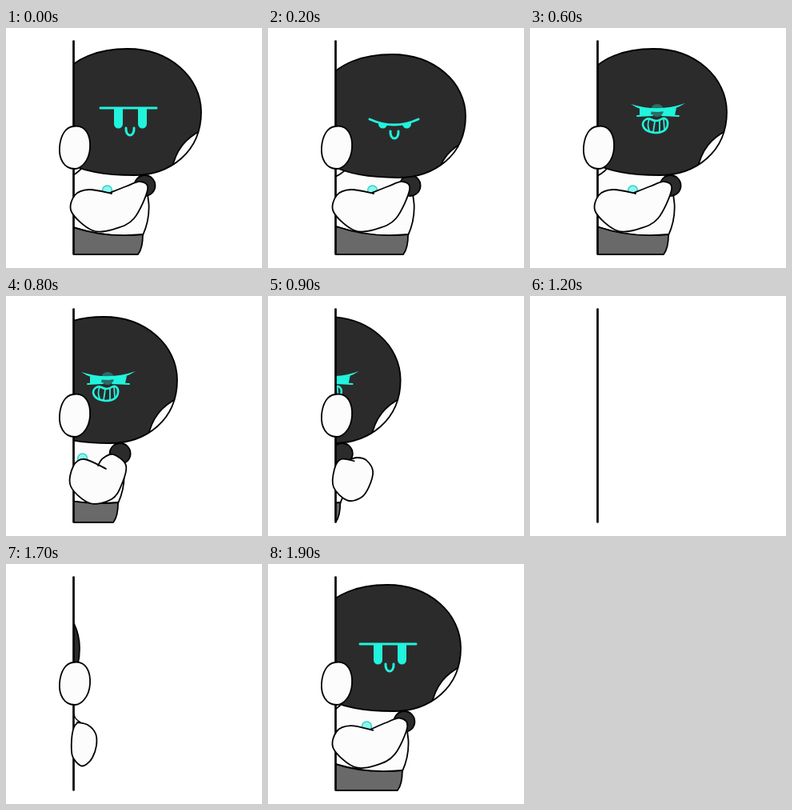
These frames come from a looping animation (320 by 300 pixels, 2 s). An HTML page with a canvas:

```html
<!DOCTYPE html>
<html lang="en">
<head>
<meta charset="utf-8">
<title>Peeking robot</title>
<style>
html, body { margin: 0; width: 100%; height: 100%; overflow: hidden; background: #fff; }
canvas { display: block; }
</style>
</head>
<body>
<canvas id="stage" width="320" height="300"></canvas>
<script>
const ctx = document.getElementById('stage').getContext('2d');
const WALL = 84.5, INK = '#000', DARK = '#2b2b2b', WHITE = '#fcfcfc', CYAN = '#22f3dc', GREY = '#696969';
const STEP = 100, LOOP = 2000;

const shape = d => new Path2D(d);
const HEAD = shape('M70 60C85 38 115 26 152 26C205 26 244 62 244 105C244 155 205 184 160 184C125 184 95 180 70 165Z');
const EAR = shape('M246 127C225 137 212 152 207 178L250 195L255 127Z');
const TORSO = shape('M70 165L165 180C182 205 182 235 171 259C140 262 110 257 84 249L70 246Z');
const SHORTS = shape('M70 246L84 249C110 258 140 261 171 258C171 270 169 278 165 283L70 283Z');
const NECK = shape('M80 186Q91 181 98 171');
const HAND = shape('M84 123C100 120 106 135 105 150C104 166 94 176 86 176C72 176 66 163 67 149C68 135 74 124 84 123Z');
const SLEEVE = shape('M85 188Q86 194 93 198L85 210Z');
const GRIN = shape('M139 121C139 115 145 112 149 114Q156 118 162 114C167 111 171 115 170 121C169 128 163 131 154 131C145 130 140 127 139 121Z');
const TEETH = shape('M147 114Q144 121 147 128M154 117L152 130M160 116L160 130M165 113L166 127');
const GLARE = shape('M135 100Q158 105 181 100L179 109L163 109L162 105L150 105L149 109L135 109Z');
const BROW = shape('M124 95Q158 106 192 94Q177 104 158 105Q138 105 124 95Z');
const LIDS = shape('M132 110L151 109M163 109L184 110');

// Forearm outlines, drawn as smooth curves from the crook of the arm.
const ARM_FOLDED = [[130,206],[150,198],[168,192],[177,202],[160,238],[136,251],[108,253],[82,230],[86,209],[104,202],[132,207]];
const ARM_PULLED = [[115,212],[121,203],[134,198],[150,212],[144,237],[132,254],[105,259],[81,238],[84,213],[98,204],[125,216]];
const ARM_FINGERS = [[89,198],[102,201],[112,212],[113,227],[108,242],[101,250],[93,252],[83,240],[82,220],[85,204],[91,197]];

// Keys are [step, value].
const SLIDE = [[0,0],[2,3],[4,4],[6,2],[7,-5],[8,-30],[11,-175],[12,-200],[15,-200],[17,-152],[18,-29],[19,-3]];
const NOD = [[0,0],[2,1],[3,1],[4,.3],[5,-.1],[6,0]];
const HAND_REACH = [[10,1],[11,.8],[12,0],[14,1]];
const ARM_REACH = [[10,1],[11,.4],[12,0],[14,0],[17,1]];

const mix = (a, b, k) => a + (b - a) * k;
const clamp = v => Math.max(0, Math.min(1, v));

function track(keys, step) {
  const i = keys.findIndex(key => key[0] >= step);
  if (i < 0) return keys[keys.length - 1][1];
  if (i === 0) return keys[0][1];
  const [s0, v0] = keys[i - 1], [s1, v1] = keys[i];
  return mix(v0, v1, (step - s0) / (s1 - s0));
}

function ink(path, fill, line = INK, width = 1.8) {
  if (fill) { ctx.fillStyle = fill; ctx.fill(path); }
  ctx.strokeStyle = line;
  ctx.lineWidth = width;
  ctx.stroke(path);
}

function group(draw) {
  ctx.save();
  draw();
  ctx.restore();
}

function disc(x, y, r) {
  const p = new Path2D();
  p.arc(x, y, r, 0, Math.PI * 2);
  return p;
}

function smooth(points) {
  const p = new Path2D();
  p.moveTo(...points[0]);
  for (let i = 0; i < points.length - 1; i++) {
    const b = points[i], c = points[i + 1];
    const a = points[i - 1] || b, d = points[i + 2] || c;
    p.bezierCurveTo(b[0] + (c[0] - a[0]) / 6, b[1] + (c[1] - a[1]) / 6,
      c[0] - (d[0] - b[0]) / 6, c[1] - (d[1] - b[1]) / 6, c[0], c[1]);
  }
  return p;
}

const morph = (from, to, k) =>
  from.map(([x, y], i) => [mix(x, to[i][0], k), mix(y, to[i][1], k)]);

function armPath(slide) {
  const pull = clamp(-slide / 30), hide = clamp((-slide - 30) / 95);
  return smooth(morph(morph(ARM_FOLDED, ARM_PULLED, pull), ARM_FINGERS, hide));
}

function sleepyFace(drop) {
  const left = mix(118, 124, drop), right = mix(188, 185, drop);
  const y = mix(100, 114, drop), sag = y + 14 * drop;
  const lid = new Path2D();
  lid.moveTo(left, y);
  lid.quadraticCurveTo((left + right) / 2, sag, right, y);
  group(() => {
    const below = new Path2D(lid);
    below.lineTo(right, 150);
    below.lineTo(left, 150);
    ctx.clip(below);
    ctx.fillStyle = CYAN;
    for (const x of [140.5, 170.5]) {
      ctx.beginPath();
      ctx.roundRect(x - 5.5, 90, 11, 35.5, 5.5);
      ctx.fill();
    }
  });
  ink(lid, null, CYAN, 3);
  const m = mix(125, 129, drop);
  ink(shape(`M150 ${m}C149 ${m + 12} 161 ${m + 12} 160 ${m}`), null, CYAN, 3);
}

function grinFace() {
  ctx.fillStyle = CYAN;
  ctx.fill(GLARE);
  ctx.fillStyle = '#2a6c66';
  ctx.fill(disc(157, 103, 8));
  ctx.fillStyle = CYAN;
  ctx.fill(BROW);
  ink(LIDS, null, CYAN);
  ink(GRIN, null, CYAN, 2.6);
  ink(TEETH, null, CYAN);
}

function drawBody() {
  ink(TORSO, WHITE);
  ink(SHORTS, GREY);
  ink(NECK);
  ink(disc(126.5, 203, 6), '#8ff5ee', '#35d3cb', 1.6);
  ink(disc(173.5, 197, 13), DARK);
}

function drawHead(nod) {
  const scale = 1 - nod * 4 / 158;
  group(() => {
    ctx.translate(0, 26 + 7 * nod - 26 * scale);
    ctx.scale(1, scale);
    ctx.fillStyle = DARK;
    ctx.fill(HEAD);
    group(() => {
      ctx.clip(HEAD);
      ctx.translate(0, 9 * nod);
      ink(EAR, WHITE);
    });
    ink(HEAD);
  });
}

function drawFace(step, nod) {
  if (step < 3) sleepyFace(step / 2);
  else if (step > 11) sleepyFace(0);
  else {
    ctx.translate(0, 7 * nod);
    grinFace();
  }
}

function reach(amount, draw) {
  if (!amount) return;
  group(() => {
    ctx.translate(WALL, 0);
    ctx.scale(amount, 1);
    ctx.translate(-WALL, 0);
    draw();
  });
}

function drawStep(step) {
  const slide = track(SLIDE, step), nod = track(NOD, step);
  ctx.fillStyle = '#fff';
  ctx.fillRect(0, 0, 320, 300);
  ctx.lineCap = ctx.lineJoin = 'round';
  group(() => {
    ctx.beginPath();
    ctx.rect(WALL, 0, 320, 300);
    ctx.clip();
    group(() => {
      ctx.translate(slide * 1.03 + nod, 0);
      drawBody();
    });
    ctx.translate(slide, 0);
    drawHead(nod);
    drawFace(step, nod);
  });
  ink(shape('M84.5 16.5V282.5'), null, INK, 2.7);
  reach(track(ARM_REACH, step), () => {
    if (slide < -125) ink(SLEEVE, WHITE, INK, 1.5);
    ink(armPath(slide), WHITE);
  });
  reach(track(HAND_REACH, step), () => ink(HAND, WHITE));
}

function tick() {
  drawStep(Math.floor(performance.now() % LOOP / STEP));
  requestAnimationFrame(tick);
}
tick();
</script>
</body>
</html>
```
